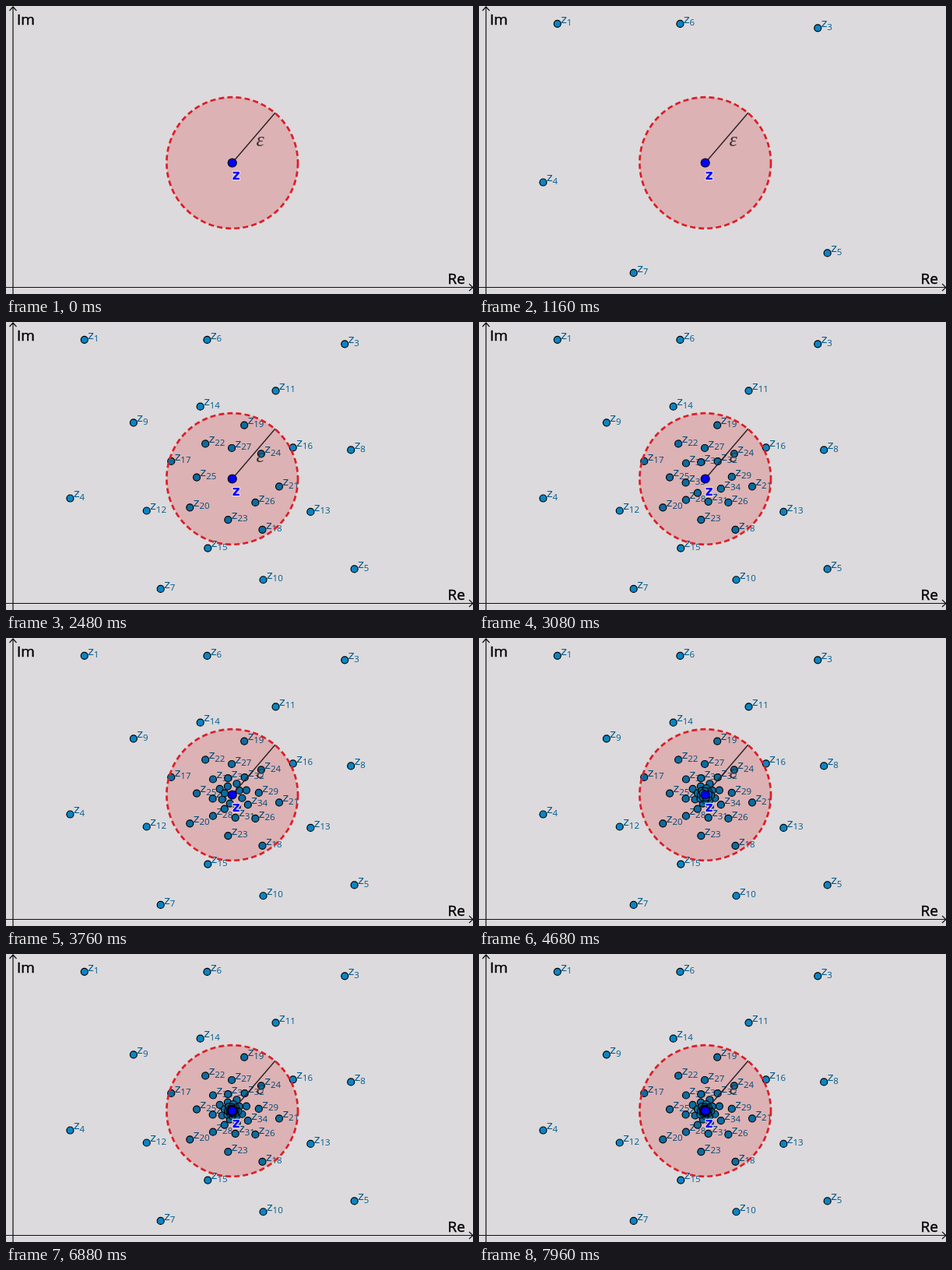
Recreate the animation shown at these times as an HTML page. Size 600 by 370 pixels, loop 8 s.

```html
<!DOCTYPE html>
<html lang="en">
<head>
<meta charset="utf-8">
<title>Convergent sequence in the complex plane</title>
<style>
  html, body { margin: 0; width: 100%; height: 100%; overflow: hidden; background: #dcdadc; }
  svg { display: block; width: 600px; height: 370px; }
  .axis { fill: none; stroke: #111; stroke-width: 1.2; }
  .name { font: 19px "Open Sans", "Noto Sans", sans-serif; stroke: #000; stroke-width: 0.4; }
  .limit { font: bold 17px "DejaVu Sans", sans-serif; fill: #00f; stroke: #e6d3e0; stroke-width: 2.5; paint-order: stroke; }
  .epsilon { font: italic 26px "Liberation Serif", serif; fill: #3a3030; text-anchor: middle; }
  #points { fill: #0a85c4; stroke: #000; stroke-width: 1.2; }
  #labels { font: 14.5px "DejaVu Sans", sans-serif; fill: #005a8e; }
  #labels tspan { font: 11.5px "Open Sans", "Noto Sans", sans-serif; }
  .disc { fill: #ffd0d1; mix-blend-mode: multiply; }
  .rim { fill: none; stroke: #dc1e28; stroke-width: 2.7; stroke-dasharray: 7 4.15; }
</style>
</head>
<body>
<svg viewBox="0 0 600 370">
  <rect width="600" height="370" fill="#dcdadc"/>
  <path class="axis" d="M9 370V1M4.5 6L9 1L13.5 6M0 361.5H600M595 357L600 361.5L595 366"/>
  <text class="name" x="14" y="23.5">Im</text>
  <text class="name" x="567.5" y="356.5">Re</text>
  <g id="labels"></g>
  <g id="points"></g>
  <circle class="disc" cx="290.7" cy="201.5" r="84.3"/>
  <path d="M290.7 201.5L346 137" stroke="#2b2024" stroke-width="1.4"/>
  <circle class="rim" cx="290.7" cy="201.5" r="84.3"/>
  <text class="epsilon" x="326.5" y="180">ε</text>
  <text class="limit" x="290.7" y="222.5">z</text>
  <circle cx="290.7" cy="201.5" r="5.5" fill="#00f" stroke="#000" stroke-width="1.2"/>
</svg>
<script>
  const LOOP = 8000, START = 720, STEP = 40;
  const COUNT = 109, LABELLED = 35;
  const CENTER = { x: 290.7, y: 201.5 };
  const RADIUS = 260.8, SHRINK = 0.93, ANGLE = 223.25, TURN = -136.7;

  function add(parent, tag, attrs, text = "") {
    const el = document.createElementNS("http://www.w3.org/2000/svg", tag);
    for (const key in attrs) el.setAttribute(key, attrs[key]);
    el.textContent = text;
    return parent.appendChild(el);
  }

  // Powers of one complex number: a shrinking, turning spiral.
  function place(n) {
    const r = RADIUS * SHRINK ** (n - 1);
    const a = (ANGLE + TURN * (n - 1)) * Math.PI / 180;
    return { x: CENTER.x + r * Math.cos(a), y: CENTER.y + r * Math.sin(a) };
  }

  const labels = document.getElementById("labels");
  const points = document.getElementById("points");
  const terms = Array.from({ length: COUNT }, (_, i) => {
    const { x, y } = place(i + 1);
    const parts = [add(points, "circle", { cx: x, cy: y, r: 4.5 })];
    if (i < LABELLED) {
      const label = add(labels, "text", { x: x + 4.5, y: y - 1.3 }, "z");
      add(label, "tspan", { dy: 3.5 }, i + 1);
      parts.push(label);
    }
    return parts;
  });

  function draw(time) {
    const step = Math.floor((time % LOOP - START) / STEP);
    const shown = step < 0 ? 0 : Math.floor(step * 3 / 5) + 1;
    terms.forEach((parts, i) => {
      for (const el of parts) el.style.display = i < shown ? "" : "none";
    });
  }

  const origin = performance.now();
  function tick() {
    draw(performance.now() - origin);
    requestAnimationFrame(tick);
  }
  tick();
</script>
</body>
</html>
```
